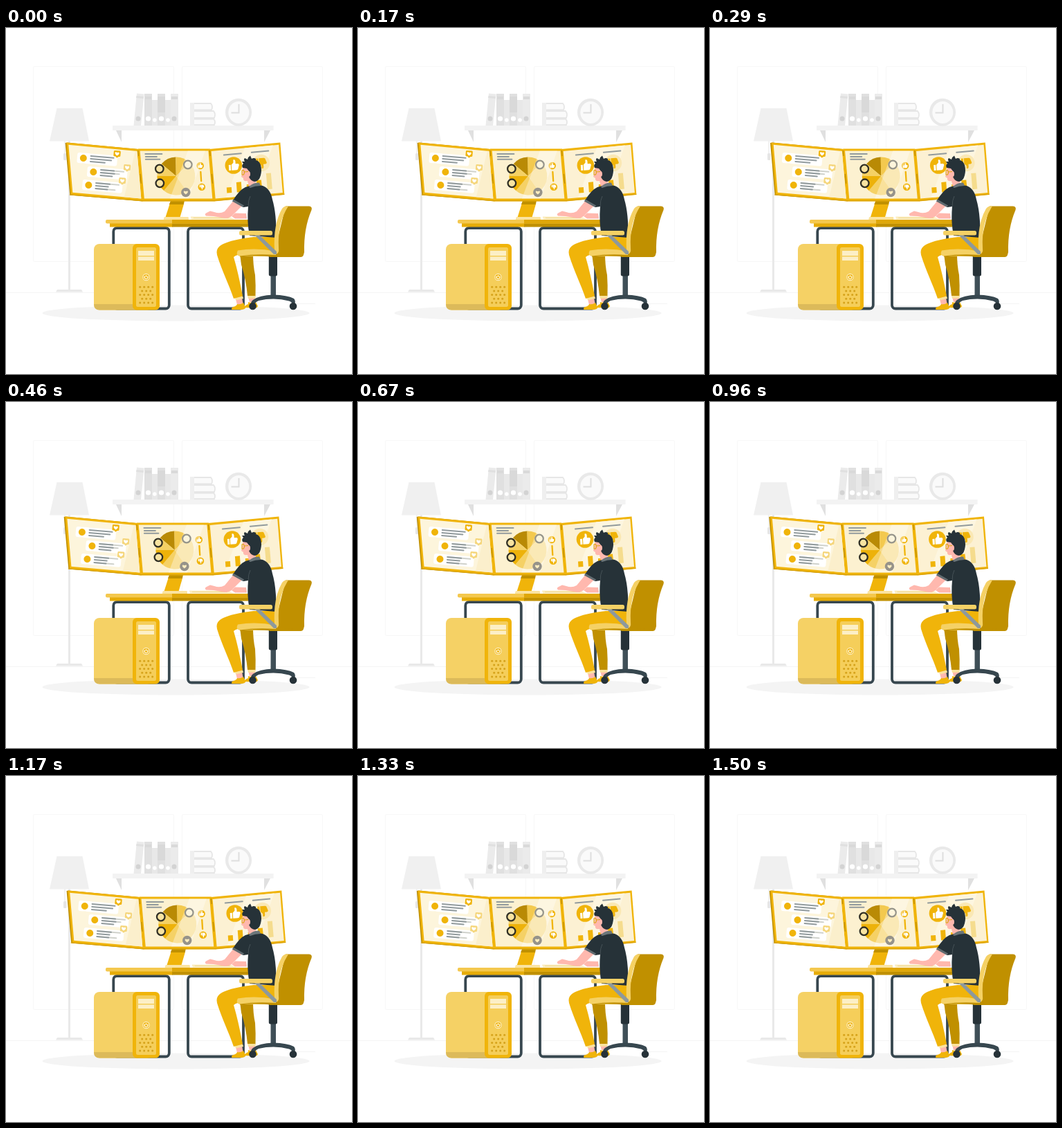
Write an HTML page that moves like this. It is 500 px wide and 500 px high and loops after 1.54 s.

```html
<!DOCTYPE html>
<html lang="en">
<head>
<meta charset="utf-8">
<title>Desk with three screens</title>
<style>
html, body { margin: 0; width: 100%; height: 100%; overflow: hidden; background: #fff; }
svg { display: block; width: 100vw; height: 100vh; }
.y { fill: #f0b40a; } .p { fill: #f5d165; } .d { fill: #c09000; }
.k { fill: #263238; } .s { fill: #ffb8ae; } .w { fill: #fff; }
.line { fill: none; stroke: #929b9d; stroke-width: 2; stroke-linecap: round; }
.soft { stroke: #d0d2cc; }
</style>
</head>
<body>
<svg viewBox="0 0 500 500">
  <defs>
    <path id="heart" d="M0 3C-5 0-3.2-3.4 0-1.3C3.2-3.4 5 0 0 3Z"/>
    <path id="thumb" d="M-7-1H-4V7H-7ZM-3-1L0-4V-8Q3-9 3-5V-2H6Q8-2 8 0L6 6Q5.500 7 4 7H-3Z"/>
    <path id="badge" d="M-3.500-5H3.500Q5-5 5-3.500V2Q5 3.500 3.500 3.500H2.500L0 5.500L-2 3.500H-3.500Q-5 3.500-5 2V-3.500Q-5-5-3.500-5Z"/>
  </defs>

  <!-- room -->
  <g fill="none" stroke="#f7f7f7">
    <rect x="39.500" y="55.500" width="203" height="282" rx="2"/>
    <rect x="254.500" y="55.500" width="203" height="282" rx="2"/>
    <path d="M0 382.500H500M415 398.500H447" stroke="#f4f4f4"/>
  </g>
  <ellipse cx="245.500" cy="412" rx="193" ry="11.500" fill="#f4f4f4"/>

  <!-- lamp -->
  <path d="M85 162V182" stroke="#e4e4e4"/>
  <rect x="83" y="181" width="4.500" height="10" rx="1.500" fill="#e6e6e6"/>
  <path d="M90 162H93V378H109L111 381.500H72L74 378H90Z" fill="#e9e9e9"/>
  <path d="M73.500 116H110.500L120 163.500H63Z" fill="#f0f0f0"/>

  <!-- shelf -->
  <path d="M159 148H167V165ZM373 148H382L373 165Z" fill="#e0e0e0"/>
  <path d="M154 141H386.500V148H154Z" fill="#f3f3f3"/>
  <path d="M189 94.500L199.500 95.500L195 141H184.500Z" fill="#ebebeb"/>
  <path d="M188.500 98L199 99L198.500 102L188 101Z" fill="#e0e0e0"/>
  <path d="M200 95H211V141H200ZM219 95H230V141H219Z" fill="#e0e0e0"/>
  <path d="M211 104H219V141H211ZM230 104H238V141H230Z" fill="#e8e8e8"/>
  <path d="M238 95H249V141H238Z" fill="#ebebeb"/>
  <path d="M201 99H210V103H201ZM219 99H230V122H219ZM239 99H248V103H239Z" fill="#d9d9d9"/>
  <g class="w">
    <circle cx="205.500" cy="131" r="3.600"/><circle cx="214.800" cy="133" r="2.800"/>
    <circle cx="224.500" cy="131" r="3.600"/><circle cx="234" cy="133" r="2.800"/>
  </g>
  <circle cx="191" cy="131" r="3.500" fill="#d3d3d3"/><circle cx="243" cy="131" r="3.500" fill="#d3d3d3"/>
  <g fill="#fafafa" stroke="#e6e6e6" stroke-width="1.800">
    <path d="M267 109H296Q299.500 113 297 118.500H267ZM267 120H300Q303.500 124 301 130H267ZM267 131.500H300Q303.500 135 301 140H267Z"/>
  </g>
  <path d="M266 108H272V141H266Z" fill="#efefef"/>
  <ellipse cx="336" cy="121.700" rx="19" ry="20" fill="#e9e9e9"/>
  <ellipse cx="336.300" cy="122" rx="15" ry="16" fill="#fafafa"/>
  <path d="M336.500 110V122.500H325.500" fill="none" stroke="#dedede" stroke-width="2"/>

  <!-- desk -->
  <g fill="none" stroke="#37474f" stroke-width="3.800">
    <rect x="155.300" y="289" width="80.500" height="116.500" rx="5"/>
    <rect x="263" y="289" width="80" height="116.500" rx="5"/>
  </g>
  <path d="M150 281H241V287.500H150Z" fill="#e6ac08"/>
  <path class="d" d="M240 281H350V287.500H240Z"/>
  <rect x="144" y="277" width="245" height="5.500" rx="2" fill="#f4c84e"/>
  <path d="M240 277H350V282.500H240Z" fill="#dfa708"/>

  <!-- computer -->
  <rect class="p" x="127" y="312" width="85" height="95.500" rx="8"/>
  <path d="M127 399H190V407.500H135Q127 407.500 127 399Z" fill="#dcba5a"/>
  <rect class="y" x="183" y="312" width="39" height="95.500" rx="6"/>
  <rect x="188" y="317" width="29" height="86" rx="2.500" fill="#f5ce5a"/>
  <path d="M191 322H214V329H191ZM191 330.500H214V336H191Z" fill="#fcefc6"/>
  <circle class="y" cx="202.500" cy="360" r="4.600" stroke="#fcefc6" stroke-width="1.100"/>
  <path d="M200.800 358.500A2.400 2.400 0 1 0 204.200 358.500M202.500 357V360" fill="none" stroke="#fff" stroke-width="1.100"/>
  <g id="vents" fill="#d5a21a"></g>

  <!-- screens -->
  <g id="screens">
    <path class="d" d="M238 250H258L257 255H236Z"/>
    <path class="y" d="M236.500 255H257L251.500 274H230.500Z"/>
    <path d="M230 273H263Q264.500 273 264 277H228Q228 273 230 273Z" fill="#fae3a0"/>
    <path d="M267 272.500H322L331 276.500H268Z" fill="#fcedbf"/>
    <path d="M271 274.500H322" stroke="#efd88e"/>

    <path class="d" d="M85.800 166L89 165.500L191 175L197.500 250.500L92.500 241.500Z"/>
    <path class="y" d="M87.500 165.500L191.500 175L198 250.500L94 240.500Z"/>
    <path class="y" d="M191 174.500H295L301.500 250.500H197.500Z"/>
    <path class="y" d="M294 175L396.500 165.500L402.500 241L301 250.500Z"/>
    <path d="M92 241L197.500 249.700H301L402.500 240.200" fill="none" stroke="#d9a20a" stroke-width="1.200"/>
    <path d="M191 177L197.500 249M294.500 177L301 249" stroke="#b88a00" stroke-width="1.200" stroke-dasharray="8 26 14 30"/>
    <path d="M90.500 168.700L189.500 178L195.500 246.500L96.500 237.800Z" fill="#fdf5dc"/>
    <path d="M187 177.800L189.500 178L195.500 246.500L171 244.300Z" fill="#fbefcc"/>
    <path d="M193.800 177.500H292.500L298.500 246.500H200Z" fill="#fcf1d0"/>
    <path d="M296.800 178L394.300 168.800L400 238L302.800 246.500Z" fill="#fcf1d3"/>
    <path d="M345 173.500L386 169.600L360 241.500L318 245Z" fill="#fdf6e0"/>

    <g id="list"></g>

    <path class="line" d="M201.500 182H225.500M202 186H218M202 189.800H222.500"/>
    <g id="pie" transform="translate(246 214)"></g>
    <g class="y">
      <circle cx="280.800" cy="199" r="5.300"/><circle cx="283" cy="229.700" r="5.300"/>
    </g>
    <path d="M263 177.500H288L264 246.500H237Z" fill="#fff" opacity=".35"/>
    <g fill="#f8e3a0" stroke="#302f25" stroke-width="2.300">
      <circle cx="222" cy="203.500" r="5.800"/><circle cx="222.500" cy="224.300" r="5.800"/>
    </g>
    <circle cx="263" cy="197.500" r="5.800" fill="#fdf5dc" stroke="#95948a" stroke-width="2.200"/>
    <circle cx="260" cy="237.500" r="6.700" fill="#96938a"/>
    <use href="#heart" x="260" y="237.500" fill="#fcedbf"/>
    <use class="w" href="#thumb" transform="translate(280.800 199) scale(.45)"/>
    <use class="w" href="#thumb" transform="translate(283 229.700) scale(.45 -.45)"/>
    <path d="M281.500 208L282.300 221" stroke="#f0b40a" stroke-width="2.300" stroke-linecap="round"/>

    <path class="line" d="M315 183.500L340 181.300M355 179.700L379.500 177.500"/>
    <circle class="y" cx="329" cy="198.500" r="12.300"/>
    <use class="w" href="#thumb" transform="translate(329 198.500) rotate(-4)"/>
    <circle cx="369" cy="195" r="12.300" fill="#fae8b4"/>
    <use class="y" href="#thumb" transform="translate(369 195) rotate(-5) scale(1 -1)"/>
    <path class="y" d="M319 230.500L326 230L326.500 238L319.500 238.500ZM333 223L340 222.300L341 237L334 237.500ZM348 226H355V236H348ZM362 220L369 219.400L370.500 234L363 235Z"/>
    <path d="M376 210L383 209.400L385 232.500L378 233.300Z" fill="#f5dc8d"/>
  </g>

  <!-- legs -->
  <path class="s" d="M349 385H360V396H352ZM331 388L340 386L343 400H334Z"/>
  <path d="M349 387H361L360.500 390.500L350 391ZM331 390L342 387.500L343 391L332 393.500Z" fill="#fae3a0"/>
  <path class="y" d="M350 396Q355 398 360 394L364 402Q363 405 358 404.500L344 404Q346 400 350 399Z"/>
  <path class="y" d="M334 399Q339 400 343 397L346.500 404Q345 407 340 407H326.500Q325 405 328 403Q333 402 334 399Z"/>
  <path class="d" d="M338 326H357Q357 343 360 357Q361 371 360.500 387H349Q347 364 340 342Z"/>
  <path class="y" d="M389 302H358C338 304 317 309 309 315Q303 320 305 328C312 351 322 370 329 391L342 387.500Q336 355 329 331Q333 327 344 327L389 326Z"/>

  <!-- chair base -->
  <path d="M382.500 355H390V388H382.500Z" fill="#3f4f57"/>
  <path d="M354.500 400Q353 396 357 393Q366 386 386 385.500Q407 386 416 391Q419 394 417 400H414Q414 396 409 394.500Q388 389 365 394Q360 396 359 400Z" fill="#37474f"/>
  <circle class="k" cx="356.500" cy="402" r="5.300"/><circle class="k" cx="415" cy="402" r="5.300"/>
  <rect class="k" x="379.800" y="325" width="12.200" height="33.500" rx="2.500"/>

  <!-- person -->
  <path class="s" d="M347 268L331 267.500L326 272L331 275.500H348Z"/>
  <path class="s" d="M330 248L342 256L326 272Q321 276 314 274.500L300 272L289 271.500Q286 269 290 267L295 264.500L301 266Q309 269 316 265Z"/>
  <path class="s" d="M343 201Q341 207 341.500 210L340 215L343 217Q342 222 349 221L351 229H361V205L350 197Z"/>
  <path class="k" d="M346 230Q359 225 371 228Q382 232 385 248Q391 268 390.500 303L352 300Q348 281 350 258L343 259L327.500 250Q337 234 346 230Z"/>
  <path d="M328.500 247.500L344 256.500L342.500 259L327 250.500Z" fill="#606b70"/>
  <path d="M351 230Q356 223 366 223.500L368 228Q360 228 353 231Z" fill="#6b767a"/>
  <path d="M350 258Q350 249 353 243" fill="none" stroke="#455156"/>
  <path class="k" d="M342 202Q340 198 343 196L341 193L345 193Q343 190 345 188L349 190Q350 186 353 184.500L355 189Q358 187 361 189L361 191Q366 192 368 198Q370 206 368 213Q366 221 360 222Q354 222 351 215L352 208L348 203Z"/>
  <ellipse class="s" cx="350.500" cy="211" rx="2.500" ry="4"/>
  <path d="M341 206Q344 204 344.500 209Q344 213 341 212ZM344.500 208L350 207.500" fill="none" stroke="#dda611" stroke-width="1.100"/>

  <!-- chair -->
  <path class="d" d="M404 257.500H438Q443 258 441.500 263Q430 290 431 324Q430 331 424 331H380Q389 326 390 315Z"/>
  <path class="p" d="M404 257.500H408Q392 282 394 318Q395 326 390 327L388 321Q386 283 399 261Q401 258 404 257.500Z"/>
  <path class="p" d="M335 321.500Q362 317 390 323V330H338Q331 328 335 321.500Z"/>
  <path class="d" d="M338 329.500Q362 326 390 328L430 326.500Q430 331 425 331H389Q360 328 338 330.500Z"/>
  <path d="M359 299H366L391 323V327H387Z" fill="#8d999d"/>
  <rect class="p" x="337" y="293" width="48" height="6.500" rx="2.500"/>
</svg>
<script>
const el = id => document.getElementById(id);

// staggered vent holes
let vents = '';
for (let r = 0; r < 5; r++)
  for (let c = 0; c < 4 - r % 2; c++)
    vents += `<circle cx="${193.7 + r % 2 * 3 + c * 6}" cy="${374.2 + r * 5.7}" r="1.5"/>`;
el('vents').innerHTML = vents;

// list rows: avatar position, badge colour, widths of grey and pale line parts
const rows = [
  [112, 188, '#f0b40a', [33, 30, 21], [0, 0, 0]],
  [126.5, 208, '#f5d67c', [19, 20, 17], [33, 27, 0]],
  [119.5, 227, '#f5d67c', [20, 18, 17], [33, 0, 28]]
];
const stroke = (w, i, cls) => w ? `<path class="line ${cls}" d="M10.5 ${i * 4 - 4}h${w}"/>` : '';
el('list').innerHTML = rows.map(([x, y, tint, dark, pale]) =>
  `<g transform="translate(${x} ${y}) rotate(5)">
    <rect x="-9" y="-7.5" width="58" height="15" rx="3" fill="#fff"/>
    <circle class="y" r="5"/>
    ${pale.map((w, i) => stroke(w, i, 'soft')).join('')}
    ${dark.map((w, i) => stroke(w, i, '')).join('')}
    <g transform="translate(48 -10)"><use href="#badge" fill="${tint}"/><use href="#heart" y="-.8" fill="#fff"/></g>
  </g>`).join('');

// pie slices: start angle, end angle, colour
const slices = [
  [-140, -91, '#b98a05'], [-91, -45, '#f3c94f'], [-45, 55, '#f7dc8e'],
  [55, 130, '#f5d165'], [130, 180, '#edb20a'], [180, 220, '#f5d165']
];
const rim = a => [27.5 * Math.cos(a * Math.PI / 180), 27.5 * Math.sin(a * Math.PI / 180)].map(v => v.toFixed(2));
el('pie').innerHTML = slices.map(([a, b, c]) =>
  `<path d="M0 0L${rim(a)}A27.5 27.5 0 0 1 ${rim(b)}Z" fill="${c}"/>`).join('');

// horizontal shake, one stop per tenth of the cycle, shown at 24 pictures per second
const stops = [0, -1, 2, -4, 4, -4, 4, -4, 2, -1, 0];
const LOOP = 1540, SHAKE = 1500, LEAD = 27;
const screens = el('screens');
const start = performance.now();

function shake(ms) {
  const u = Math.min(ms / SHAKE, 1) * 10, i = Math.min(Math.floor(u), 9);
  return stops[i] + (stops[i + 1] - stops[i]) * (u - i);
}
function draw(now) {
  const t = Math.max(0, now - start) % LOOP;
  const step = Math.min(36, Math.floor((t + 5) * 24 / 1000));
  screens.setAttribute('transform', `translate(${shake(step * 1000 / 24 + LEAD).toFixed(3)} 0)`);
  requestAnimationFrame(draw);
}
draw(start);
</script>
</body>
</html>
```
